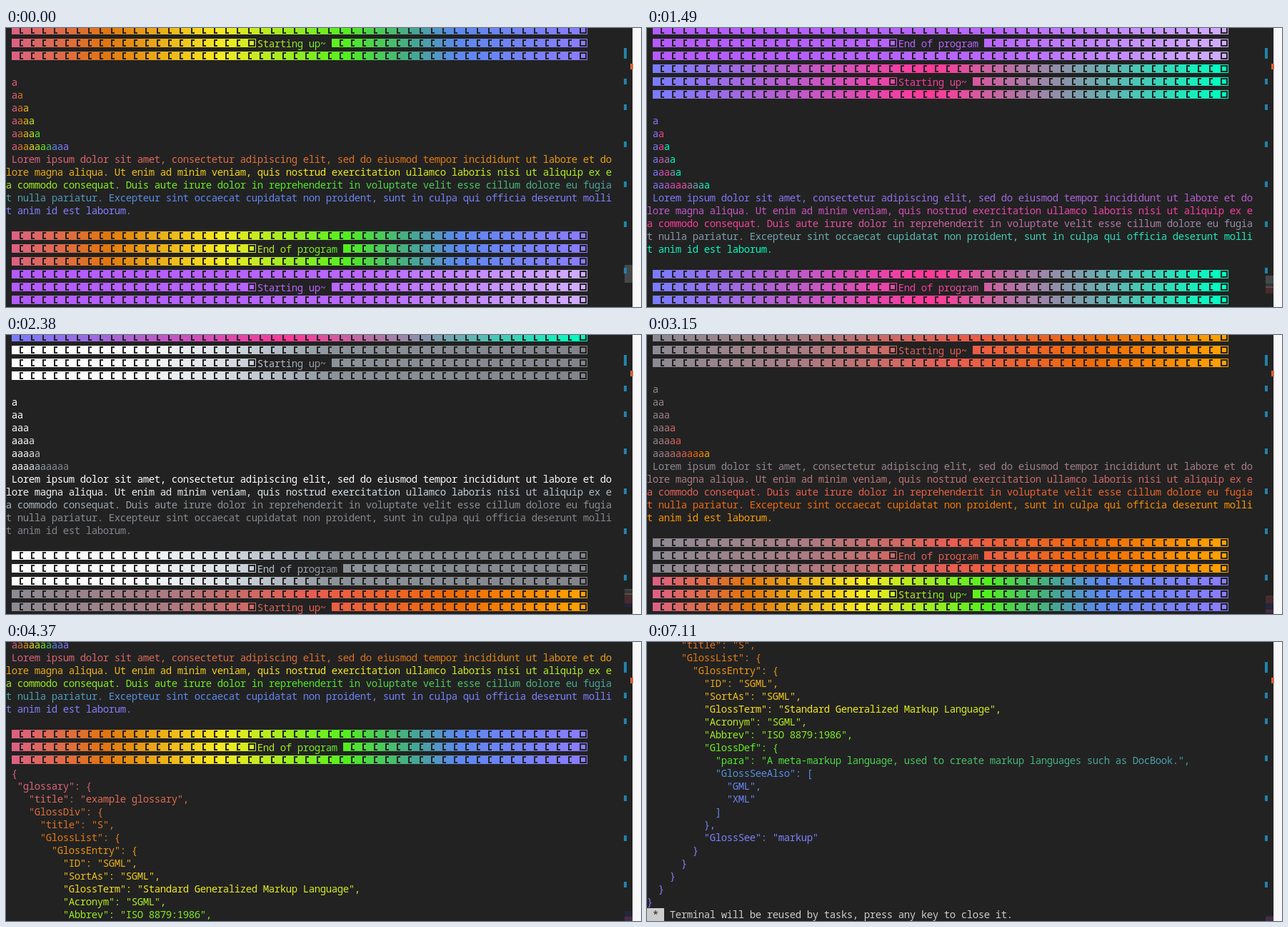
Write an HTML page with a canvas that moves like this. It is 889x391 px and loops after 8 s.

```html
<!DOCTYPE html>
<html lang="en">
<head>
<meta charset="utf-8">
<title>Gradient terminal</title>
<style>
html, body { margin: 0; width: 100%; height: 100%; overflow: hidden; background: #222; }
canvas { display: block; width: 889px; height: 391px; }
</style>
</head>
<body>
<canvas id="stage" width="889" height="391"></canvas>
<script>
const ctx = document.getElementById('stage').getContext('2d');
const CELL = 8, PITCH = 18, COLUMNS = 106, ROWS = 22, LOOP = 8000;
const SCROLL_TIMES = [0, 180, 490, 840, 1190, 1490, 1840, 2070, 2380,
  2610, 2920, 3150, 3500, 3800, 4110, 4370, 5150, 7110];
const LINES_PER_STEP = 125 / PITCH;

// size: how many colours a short text steps through
const palette = (size, ...stops) => ({
  size,
  stops: stops.map(([at, hex]) => [at, [1, 3, 5].map(i => parseInt(hex.slice(i, i + 2), 16))])
});
const rainbow = palette(8, [0, '#dc6180'], [.16, '#e0750f'], [.36, '#f7e922'],
  [.585, '#52ee20'], [.7, '#45a88c'], [.78, '#5c88ee'], [1, '#8a7cff']);
const purple = palette(3, [0, '#b45aff'], [.6, '#b966ff'], [.82, '#c48cff'], [1, '#d0acff']);
const neon = palette(3, [0, '#7a7cff'], [.485, '#ff3998'], [1, '#00ffc0']);
const silver = palette(10, [0, '#ffffff'], [.2, '#fafafa'], [.36, '#dde2e6'],
  [.46, '#b4bcc6'], [.56, '#8b9298'], [1, '#82848a']);
const ember = palette(8, [0, '#8c8a92'], [.25, '#a87c84'], [.53, '#e95c50'],
  [.77, '#ee6a08'], [1, '#ffa000']);

function colorAt({ stops }, t) {
  let i = 1;
  while (i < stops.length - 1 && t > stops[i][0]) i++;
  const [a, from] = stops[i - 1], [b, to] = stops[i];
  const k = Math.min(1, Math.max(0, (t - a) / (b - a)));
  return `rgb(${from.map((v, c) => Math.round(v + (to[c] - v) * k))})`;
}

const LOREM = ' Lorem ipsum dolor sit amet, consectetur adipiscing elit, sed do eiusmod tempor ' +
  'incididunt ut labore et dolore magna aliqua. Ut enim ad minim veniam, quis nostrud exercitation ' +
  'ullamco laboris nisi ut aliquip ex ea commodo consequat. Duis aute irure dolor in reprehenderit ' +
  'in voluptate velit esse cillum dolore eu fugiat nulla pariatur. Excepteur sint occaecat cupidatat ' +
  'non proident, sunt in culpa qui officia deserunt mollit anim id est laborum.';

const GLOSSARY = ` {
  "glossary": {
    "title": "example glossary",
    "GlossDiv": {
      "title": "S",
      "GlossList": {
        "GlossEntry": {
          "ID": "SGML",
          "SortAs": "SGML",
          "GlossTerm": "Standard Generalized Markup Language",
          "Acronym": "SGML",
          "Abbrev": "ISO 8879:1986",
          "GlossDef": {
            "para": "A meta-markup language, used to create markup languages such as DocBook.",
            "GlossSeeAlso": [
              "GML",
              "XML"
            ]
          },
          "GlossSee": "markup"
        }
      }
    }
  }
}`;

const lines = [];

function addText(text, colors) {
  const step = Math.min(1 / (colors.size - 1), 1 / Math.max(1, text.trim().length - 1));
  const lead = text.length - text.trimStart().length;
  let index = -lead;
  for (const row of text.split('\n')) {
    for (let i = 0; i < row.length || i === 0; i += COLUMNS) {
      const cells = [...row.slice(i, i + COLUMNS)]
        .map(char => ({ char, color: colorAt(colors, index++ * step) }));
      lines.push(cells);
    }
    index++;
  }
}

const bar = width => '■▣'.repeat(width / 2);
const addBar = colors => addText(' ' + bar(100), colors);

function addBanner(label, colors) {
  addBar(colors);
  addText(` ${bar(42)} ${label} ${bar(56 - label.length)}`, colors);
  addBar(colors);
}

function addRun(colors) {
  addBanner('Starting up~', colors);
  lines.push([]);
  for (const n of [1, 2, 3, 4, 5, 10]) addText(' ' + 'a'.repeat(n), colors);
  addText(LOREM, colors);
  lines.push([]);
  addBanner('End of program', colors);
}

[rainbow, purple, neon, silver, ember, rainbow].forEach(addRun);
addText(GLOSSARY, rainbow);
lines.push([...' *  Terminal will be reused by tasks, press any key to close it.']
  .map((char, i) => ({ char, color: i < 3 ? '#222' : '#ccc', back: i < 3 && '#ccc' })));

function rect(color, x, y, w, h) {
  ctx.fillStyle = color;
  ctx.fillRect(x, y, w, h);
}

function drawCell({ char, color, back }, x, y) {
  if (back) rect(back, x, y - 9, CELL, PITCH);
  if (char === '■') {
    rect(color, x, y - 7, 10, 12);
  } else if (char === '▣') {
    ctx.strokeStyle = color;
    ctx.strokeRect(x + 2.5, y - 6.5, 11, 11);
    rect(color, x + 5, y - 4, 6, 6);
  } else if (char !== ' ') {
    ctx.fillStyle = color;
    ctx.fillText(char, x + CELL / 2, y + 5);
  }
}

// The slider shows differently tinted bands of the ruler behind it.
const BANDS = [[300, '#44484a'], [358, '#333635'], [362, '#54504e'], [364, '#482a2c'],
  [376, '#25253e'], [385, '#57283a'], [388, '#37304a']];

function drawRuler(offset) {
  for (const [y, h] of [[28, 15], [71, 8], [107, 8], [159, 8], [215, 8], [271, 8], [336, 8]])
    rect('#2182ab', 865, y, 4, h);
  const top = Math.round(332 + offset * .43);
  BANDS.forEach(([y, color], i) => {
    const start = Math.max(y, top);
    const end = Math.min(i + 1 < BANDS.length ? BANDS[i + 1][0] : 391, top + 25);
    if (end > start) rect(color, 866, start, 11, end - start);
  });
  rect('#2182ab', 865, 336, 4, 8);
  rect('#d9603b', 874, 50, 4, 8);
  rect('#d8d8d8', 877, 0, 1, 391);
  rect('#f8f8f8', 878, 0, 11, 391);
  rect('#d9603b', 874, 50, 4, 8);
}

function draw(offset) {
  rect('#222', 0, 0, 889, 391);
  ctx.font = '14px "Noto Sans Mono", "DejaVu Sans Mono", monospace';
  ctx.textAlign = 'center';
  ctx.lineWidth = 1;
  lines.slice(offset, offset + ROWS).forEach((cells, row) =>
    cells.forEach((cell, col) => drawCell(cell, col * CELL, 4 + row * PITCH)));
  drawRuler(offset);
}

let shown = -1;
const start = performance.now();
function tick() {
  const time = (performance.now() - start) % LOOP;
  const step = SCROLL_TIMES.filter(t => t <= time).length - 1;
  if (step !== shown) draw(Math.round(step * LINES_PER_STEP));
  shown = step;
  requestAnimationFrame(tick);
}
tick();
</script>
</body>
</html>
```
